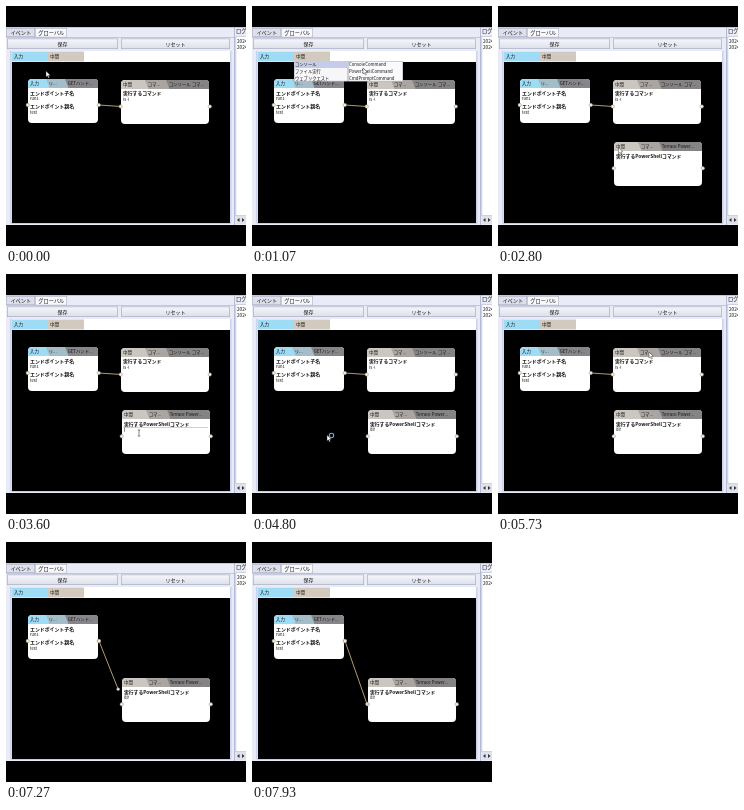
Write an HTML page with a canvas that moves like this. It is 240x240 px and loops after 8 s.

```html
<!DOCTYPE html>
<html lang="ja">
<head>
<meta charset="utf-8">
<title>ノードエディター</title>
<style>
html, body { margin: 0; width: 100%; height: 100%; overflow: hidden; background: #000; }
canvas { display: block; width: 100vw; height: 100vh; }
</style>
</head>
<body>
<canvas id="stage"></canvas>
<script>
const SIZE = 240, LOOP = 8000, STEP = 1000 / 15;
const FONT = '"Noto Sans CJK JP", "Noto Sans CJK", "Noto Sans", sans-serif';
const BLUE = '#9edcf6', TAN = '#d2cabf', WIRE = '#b19a70';
const canvas = document.getElementById('stage');
const ctx = canvas.getContext('2d');

function rect(x, y, w, h, fill) {
  ctx.fillStyle = fill;
  ctx.fillRect(x, y, w, h);
}

function box(x, y, w, h, fill, edge) {
  rect(x, y, w, h, edge);
  rect(x + .7, y + .7, w - 1.4, h - 1.4, fill);
}

function text(s, x, y, size = 4.5, weight = 400, align = 'left', color = '#111') {
  ctx.font = `${weight} ${size}px ${FONT}`;
  ctx.textAlign = align;
  ctx.textBaseline = 'middle';
  ctx.fillStyle = color;
  ctx.fillText(s, x, y);
}

function poly(points, fill) {
  ctx.beginPath();
  points.forEach(([x, y]) => ctx.lineTo(x, y));
  ctx.closePath();
  ctx.fillStyle = fill;
  ctx.fill();
}

function line(x1, y1, x2, y2, color, width = 1) {
  ctx.beginPath();
  ctx.moveTo(x1, y1);
  ctx.lineTo(x2, y2);
  ctx.strokeStyle = color;
  ctx.lineWidth = width;
  ctx.stroke();
}

function dot(x, y, r = 1.7) {
  ctx.beginPath();
  ctx.arc(x, y, r, 0, Math.PI * 2);
  ctx.fillStyle = '#f3eee2';
  ctx.fill();
  ctx.strokeStyle = '#998b70';
  ctx.lineWidth = .5;
  ctx.stroke();
}

// Eased position along [time, x, y] stops.
function along(path, t) {
  let a = path[0];
  for (const b of path) {
    if (t < b[0]) {
      const p = Math.max(0, (t - a[0]) / (b[0] - a[0] || 1));
      const e = p * p * (3 - 2 * p);
      return [a[1] + (b[1] - a[1]) * e, a[2] + (b[2] - a[2]) * e];
    }
    a = b;
  }
  return [a[1], a[2]];
}

const pointerPath = [
  [0, 40, 65], [200, 40, 65], [550, 54, 51], [720, 54, 51],
  [850, 62, 59], [1070, 111, 62], [1200, 112, 65], [1400, 112, 65],
  [1650, 116, 142], [2070, 117, 141], [2550, 120, 141], [2750, 120, 141],
  [3200, 133, 159], [4250, 133, 159], [4600, 75, 161], [4950, 75, 161],
  [5400, 151, 78], [5850, 151, 78], [6300, 93, 99]
];
const nodePath = [[1400, 113, 136], [2070, 113, 136], [2550, 116, 136]];
const wirePath = [[6450, 93, 99], [6600, 99, 97], [6800, 104, 105], [7500, 115, 162]];

function button(x, w, label) {
  const g = ctx.createLinearGradient(0, 32, 0, 43);
  g.addColorStop(0, '#f7f8fd');
  g.addColorStop(1, '#dcdfe8');
  box(x, 32.5, w, 10.5, g, '#a9afc5');
  text(label, x + w / 2, 37.8, 5, 400, 'center');
}

function drawWindow() {
  rect(0, 0, SIZE, SIZE, '#000');
  rect(0, 21, SIZE, 198, '#e9ebf6');
  rect(0, 21, SIZE, 1, '#c3c9dc');
  box(0, 22, 29, 9, '#dde0ea', '#afb5ca');
  box(29, 22, 32, 9.5, '#f8f8fd', '#afb5ca');
  text('イベント', 14.8, 26.7, 5.2, 400, 'center');
  text('グローバル', 45.3, 26.7, 5.2, 400, 'center');
  rect(0, 31, 228, .7, '#afb8da');
  button(1, 111, '保存');
  button(115, 109, 'リセット');
  rect(6, 45, 218, 11, '#fff');
  rect(6, 45.5, 36, 10, BLUE);
  rect(42, 45.5, 36, 10, TAN);
  text('入力', 8, 50.4);
  text('中間', 44, 50.4);
  rect(6, 56, 218, 161, '#000');
  rect(4.5, 45, .8, 172, '#b2bce2');
  rect(224.5, 45, .8, 172, '#b2bce2');
  rect(5, 217.2, 220, .7, '#b2bce2');

  rect(228, 21, .8, 198, '#a9b0cd');
  text('ログ', 230, 25.2, 5.2);
  box(229.5, 30, 12, 180, '#fff', '#b8bed2');
  text('2024', 231, 34.8, 4.7);
  text('2024', 231, 41.5, 4.7);
  rect(229.5, 210, 10.5, 8, '#dfe1eb');
  poly([[231, 214], [233.5, 212], [233.5, 216]], '#333');
  poly([[238.5, 214], [236, 212], [236, 216]], '#333');
}

function drawNode(x, y, w, h, cuts, tones, labels) {
  ctx.save();
  ctx.beginPath();
  ctx.roundRect(x, y, w, h, 4);
  ctx.clip();
  rect(x, y, w, h, '#fff');
  const starts = [0, ...cuts];
  starts.forEach((start, i) => {
    const left = x + start;
    poly([[left - (i ? 1 : 0), y], [x + w, y], [x + w, y + 9], [left + (i ? 2.5 : 0), y + 9]], tones[i]);
  });
  labels.forEach((s, i) => text(s, x + starts[i] + (i ? 1.7 : 2), y + 4.7, 4.4));
  ctx.restore();
}

function ports(x, y, w, dy) {
  dot(x - .3, y + dy);
  dot(x + w + .8, y + dy);
}

function drawInput() {
  drawNode(22, 73, 70, 44, [19, 38], [BLUE, '#a3bdc9', '#85858a'], ['入力', 'リ...', 'GETハンド...']);
  text('エンドポイント子名', 24, 87, 4.9, 700);
  text('run1', 24, 92.8, 4);
  text('エンドポイント親名', 24, 100.2, 4.9, 700);
  text('test', 24, 106, 4);
  ports(22, 73, 70, 26);
}

const grays = ['#cbc6c0', '#aaa5a0', '#858383'];

function drawCommand() {
  drawNode(115, 74, 88, 44, [25, 46], grays, ['中間', 'コマ...', 'コンソール コマ...']);
  text('実行するコマンド', 117, 87.5, 4.8, 700);
  text('ls -l', 117, 93.3, 4);
  ports(115, 74, 88, 26.5);
}

function drawShell(t) {
  const [x, y] = along(nodePath, t);
  drawNode(x, y, 88, 44, [25, 46], grays, ['中間', 'コマ...', 'Terrace Power...']);
  text('実行するPowerShellコマンド', x + 2, y + 14, 4.8, 700);
  const count = Math.max(0, Math.min(3, Math.floor((t - 3700) / 170)));
  const typed = 'dir'.slice(0, count);
  text(typed, x + 2, y + 19.6, 4);
  if (t > 3250 && t < 4500) {
    rect(x + 1, y + 17, 85, .5, '#9aa0a8');
    const caret = x + 2.3 + ctx.measureText(typed).width;
    if (t % 1000 < 650) rect(caret, y + 17.8, .5, 4, '#222');
  }
  ports(x, y, 88, 26.3);
}

function drawMenu(t) {
  box(42, 55, 54, 20.5, '#f7f7fa', '#b8bac4');
  rect(42.5, 55.5, 53, 6.5, '#c5cce9');
  ['コンソール', 'ファイル実行', 'ウェブリクエスト'].forEach((s, i) => text(s, 43, 58.6 + i * 6.7, 4.3));
  if (t < 880) return;
  box(96, 55, 55, 20.5, '#fafafc', '#b8bac4');
  if (t > 1130) rect(96.5, 62, 54, 6.5, '#c5cce9');
  ['ConsoleCommand', 'PowerShellCommand', 'CmdPromptCommand'].forEach((s, i) => text(s, 97, 58.6 + i * 6.7, 4.3));
}

function drawPointer(t) {
  if (t > 6450) return;
  const [x, y] = along(pointerPath, t);
  if (t > 3150 && t < 4300) {
    line(x, y - 3, x, y + 3, '#555', .7);
    line(x - 1.3, y - 3, x + 1.3, y - 3, '#555', .7);
    line(x - 1.3, y + 3, x + 1.3, y + 3, '#555', .7);
    return;
  }
  ctx.beginPath();
  [[0, 0], [0, 6], [1.4, 4.8], [2.4, 7], [3.4, 6.5], [2.5, 4.4], [4.3, 4.2]]
    .forEach(([dx, dy]) => ctx.lineTo(x + dx, y + dy));
  ctx.closePath();
  ctx.fillStyle = '#fff';
  ctx.fill();
  ctx.strokeStyle = '#222';
  ctx.lineWidth = .45;
  ctx.stroke();
  if (t > 4650 && t < 4950) {
    ctx.beginPath();
    ctx.arc(x + 4.5, y + .5, 2.2, 0, Math.PI * 2);
    ctx.strokeStyle = '#58b4ec';
    ctx.lineWidth = 1.1;
    ctx.stroke();
  }
}

function draw(t) {
  drawWindow();
  const linked = t < 5800;
  if (linked) line(93, 99, 115, 100.5, WIRE);
  drawInput();
  if (linked) drawCommand();
  if (t >= 1400) drawShell(t);
  if (t >= 6450) {
    const [x, y] = along(wirePath, t);
    line(93, 99, x, y, WIRE);
    dot(93, 99);
    dot(x, y, 1.4);
  }
  if (t >= 720 && t < 1400) drawMenu(t);
  drawPointer(t);
}

function resize() {
  const ratio = devicePixelRatio || 1;
  canvas.width = innerWidth * ratio;
  canvas.height = innerHeight * ratio;
}

function frame() {
  const t = Math.floor((performance.now() % LOOP) / STEP) * STEP;
  ctx.setTransform(canvas.width / SIZE, 0, 0, canvas.height / SIZE, 0, 0);
  draw(t);
  requestAnimationFrame(frame);
}

addEventListener('resize', resize);
resize();
frame();
</script>
</body>
</html>
```
